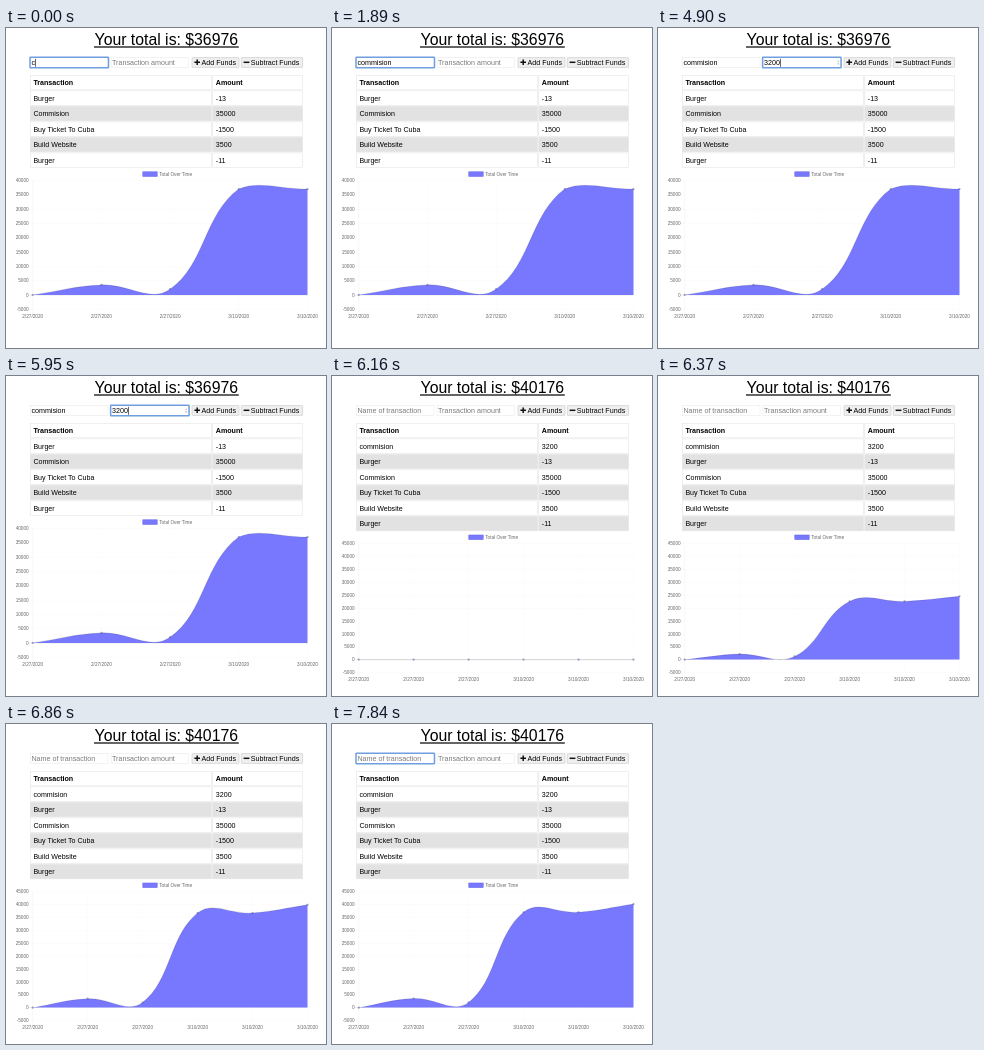
Recreate the animation shown at these times as an HTML page. Size 320 px wide and 320 px high, loop 8 s.

```html
<!DOCTYPE html>
<html lang="en">
<head>
<meta charset="utf-8">
<title>Budget tracker</title>
<style>
  html, body { margin: 0; width: 100%; height: 100%; overflow: hidden; background: #fff; }
  svg { display: block; width: 320px; height: 320px; font-family: "Liberation Sans", Arial, sans-serif; }
  text { white-space: pre; }
</style>
</head>
<body>
<svg id="stage" viewBox="0 0 320 320"></svg>
<script>
const LOOP = 8000, STEP = 70, SUBMIT = 6160, CHART_MS = 1000;
const stage = document.getElementById('stage');

function el(tag, attrs, parent = stage, content) {
  const node = document.createElementNS('http://www.w3.org/2000/svg', tag);
  for (const key in attrs) node.setAttribute(key, attrs[key]);
  if (content !== undefined) node.textContent = content;
  parent.append(node);
  return node;
}
const rect = (x, y, width, height, fill, parent, more) =>
  el('rect', { x, y, width, height, fill, ...more }, parent);
const text = (x, y, size, str, parent, more) =>
  el('text', { x, y, 'font-size': size, ...more }, parent, str);
const show = (node, on) => node.setAttribute('visibility', on ? 'visible' : 'hidden');

// Heading
const total = text(160.3, 17, 15.8, '', stage, { 'text-anchor': 'middle' });
rect(88, 18.4, 144.8, 1.2, '#000');

// Form
function field(x, width, hint) {
  rect(x + .5, 29.5, width - 1, 10, '#fff', stage, { stroke: '#e9e9e9', 'stroke-width': .6 });
  const ring = rect(x, 29.2, width, 10.6, 'none', stage, { stroke: '#6f9fe0', 'stroke-width': 1.5, rx: .6 });
  const label = text(x + 1.4, 37, 7.15, '');
  const caret = rect(0, 30.8, .6, 8, '#000');
  return (value, focused, caretOn) => {
    label.textContent = value || hint;
    label.setAttribute('fill', value ? '#000' : '#7b7b7b');
    caret.setAttribute('x', x + 1.5 + (value ? label.getComputedTextLength() : 0));
    show(ring, focused);
    show(caret, focused && caretOn);
  };
}
const nameField = field(24, 78.5, 'Name of transaction');
const amountField = field(104.6, 78.5, 'Transaction amount');
const spinner = el('path', { d: 'M179.4 33.6l.8-1.2.8 1.2zM179.4 35.6l.8 1.2.8-1.2z', fill: '#777' });

function button(x, width, label, icon) {
  rect(x, 29.6, width, 9.8, '#efefef', stage, { stroke: '#c8c8c8', 'stroke-width': .6, rx: .5 });
  el('path', { d: icon, stroke: '#111', 'stroke-width': 1.5, fill: 'none' });
  text(x + 9.5, 37, 7.15, label);
}
button(186, 47, 'Add Funds', 'M188.4 34.3h5.6M191.2 31.5v5.6');
button(235.3, 61.3, 'Subtract Funds', 'M237.6 34.3h5.8');

// Table
function table(rows) {
  const g = el('g', {});
  [['Transaction', 'Amount'], ...rows].forEach((cells, i) => {
    const y = 47.4 + i * 15.5, fill = i && i % 2 === 0 ? '#e2e2e2' : '#fff';
    const weight = i ? 'normal' : 'bold';
    [[24.3, 181.2], [206.7, 89.8]].forEach(([x, w], col) => {
      rect(x, y, w, 14.4, fill, g, { stroke: '#e4e4e4', 'stroke-width': .6 });
      text(x + 3.1, y + 10, 7.1, cells[col], g, { 'font-weight': weight });
    });
  });
  return g;
}

// Chart: smooth area whose points rise from zero
function chart(values, top, zero, max) {
  const g = el('g', {}), unit = (zero - top) / max, last = values.length - 1;
  const small = { fill: '#666' };
  rect(136.8, top - 8.6, 14.4, 4.6, '#7878ff', g, { stroke: '#6d6de6', 'stroke-width': .6 });
  text(153.2, top - 4.6, 4.7, 'Total Over Time', g, small);
  for (let v = -5000; v <= max; v += 5000) {
    const y = zero - v * unit;
    rect(23, y, 278.5, .4, v ? '#f8f8f8' : '#d8d8d8', g);
    text(22.7, y + 1.7, 4.7, v, g, { ...small, 'text-anchor': 'end' });
  }
  const xs = values.map((_, i) => 26.7 + i * 274.8 / last);
  const bottom = zero + 5000 * unit;
  xs.forEach((x, i) => {
    rect(x, top, .4, bottom - top + 4, i ? '#f9f9f9' : '#ececec', g);
    text(x, bottom + 8.6, 4.7, i < 3 ? '2/27/2020' : '3/10/2020', g, { ...small, 'text-anchor': 'middle' });
  });
  const area = el('path', { fill: '#7878ff' }, g);
  const line = el('path', { fill: 'none', stroke: '#000', 'stroke-opacity': .1, 'stroke-width': 1.1 }, g);
  const dots = xs.map(cx => el('circle', { cx, r: 1.1, fill: '#5555a0', 'fill-opacity': .55 }, g));

  const cap = y => Math.max(top, Math.min(bottom, y));
  function handles(pts, i) {
    const p = pts[Math.max(0, i - 1)], c = pts[i], n = pts[Math.min(last, i + 1)];
    const a = Math.hypot(c[0] - p[0], c[1] - p[1]), b = Math.hypot(n[0] - c[0], n[1] - c[1]);
    const k = .4 / (a + b), dx = n[0] - p[0], dy = n[1] - p[1];
    return [[c[0] - k * a * dx, cap(c[1] - k * a * dy)], [c[0] + k * b * dx, cap(c[1] + k * b * dy)]];
  }
  return {
    g,
    draw(grow) {
      const pts = values.map((v, i) => [xs[i], zero - v * unit * grow]);
      let d = 'M' + pts[0];
      for (let i = 1; i <= last; i++)
        d += `C${handles(pts, i - 1)[1]} ${handles(pts, i)[0]} ${pts[i]}`;
      line.setAttribute('d', d);
      area.setAttribute('d', `${d}L${xs[last]} ${zero}L${xs[0]} ${zero}Z`);
      dots.forEach((dot, i) => dot.setAttribute('cy', pts[i][1]));
    }
  };
}

const rows = [['Burger', -13], ['Commision', 35000], ['Buy Ticket To Cuba', -1500], ['Build Website', 3500], ['Burger', -11]];
const sums = [-11, 3489, 1989, 36989, 36976];
const before = { table: table(rows), chart: chart(sums, 152.4, 266.9, 40000) };
const after = { table: table([['commision', 3200], ...rows]), chart: chart([...sums, 40176], 167.6, 283.6, 45000) };
before.chart.draw(1);

// Timings
const nameKeys = [0, 350, 560, 770, 910, 1050, 1190, 1260, 1330];
const amountKeys = [4200, 4480, 4690, 4900];
const caretOff = [[1890, 2380], [3290, 3850], [5460, 5950], [7840, LOOP]];
const typed = (str, keys, t) => str.slice(0, keys.filter(k => k <= t).length);

function render(time) {
  const t = Math.floor(time / STEP) * STEP;
  const sent = t >= SUBMIT;
  const caretOn = !caretOff.some(([a, b]) => t >= a && t < b);
  total.textContent = 'Your total is: $' + (sent ? 40176 : 36976);
  nameField(sent ? '' : typed('commision', nameKeys, t), t < 2800 || t >= 7280, caretOn);
  amountField(sent ? '' : typed('3200', amountKeys, t), t >= 2800 && !sent, caretOn);
  show(spinner, t >= 2800 && !sent);
  for (const [state, on] of [[before, !sent], [after, sent]]) {
    show(state.table, on);
    show(state.chart.g, on);
  }
  if (sent) {
    const p = Math.min(1, (t - SUBMIT) / CHART_MS);
    after.chart.draw(1 - (1 - p) ** 4);
  }
}

const start = performance.now();
function tick() {
  render((performance.now() - start) % LOOP);
  requestAnimationFrame(tick);
}
tick();
</script>
</body>
</html>
```
